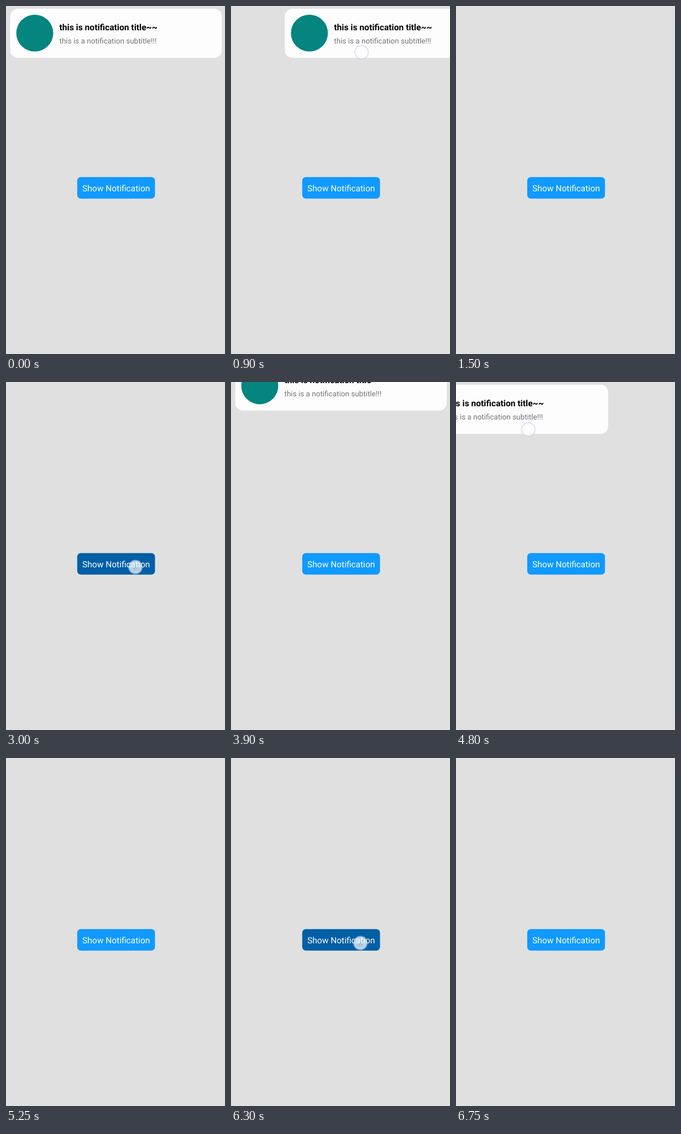
An HTML page that plays this animation: 396 by 631 pixels, repeating every 8 s.

```html
<!DOCTYPE html>
<html lang="en">
<head>
<meta charset="utf-8">
<title>Swipe to dismiss</title>
<style>
  html, body { margin: 0; width: 100%; height: 100%; overflow: hidden; background: #e0e0e0; }
  svg { display: block; width: 396px; height: 631px; font-family: Roboto, sans-serif; text-rendering: geometricPrecision; }
</style>
</head>
<body>
<svg viewBox="0 0 396 631">
  <defs>
    <radialGradient id="glow">
      <stop offset="0" stop-color="#fff" stop-opacity=".6"/>
      <stop offset=".76" stop-color="#fff" stop-opacity=".75"/>
      <stop offset=".9" stop-color="#c4c0ee" stop-opacity=".6"/>
      <stop offset="1" stop-color="#c4c0ee" stop-opacity="0"/>
    </radialGradient>
  </defs>
  <rect id="button" x="128.8" y="310.2" width="140.6" height="39" rx="6.5"/>
  <text x="199.2" y="336" font-size="15.5" fill="#fff" text-anchor="middle">Show Notification</text>
  <g id="card">
    <rect x="7.6" y="5" width="382.6" height="89" rx="14" fill="#fdfdfd"/>
    <circle cx="52" cy="49.2" r="33.4" fill="#04857f"/>
    <text x="96.5" y="44" font-size="15.6" font-weight="700">this is notification title~~</text>
    <text x="96.5" y="68.3" font-size="13.5" fill="#757575">this is a notification subtitle!!!</text>
  </g>
  <circle id="touch" r="13.8" fill="url(#glow)"/>
</svg>
<script>
const LOOP = 8000, STEP = 150;
const [button, card, touch] = ['button', 'card', 'touch'].map(id => document.getElementById(id));

const enter = { start: 3750, length: 450 };
// The finger starts at x, y, moves by dx and drops along a power curve
const swipes = [
  { start: 450 + STEP, length: 900, dir: 1, x: 146, y: 72, dx: 270, drop: 450, bend: 3.3 },
  { start: 4500, length: 750, dir: -1, x: 250, y: 76, dx: -298, drop: 64, bend: 2 }
];
const taps = [{ start: 3000, length: 600 }, { start: 6300, length: 450 }];

const progress = (move, t) => Math.min(1, Math.max(0, (t - move.start) / move.length));
const active = (move, t) => t >= move.start && t < move.start + move.length;
const mix = (a, b, k) => `rgb(${a.map((v, i) => Math.round(v + (b[i] - v) * k))})`;
const place = (el, x, y) => el.setAttribute('transform', `translate(${x} ${y})`);

function draw() {
  const t = Math.floor((performance.now() % LOOP) / STEP) * STEP;
  const swipe = swipes[t < enter.start ? 0 : 1];
  const p = progress(swipe, t);
  const rise = t < enter.start ? 0 : (1 - progress(enter, t)) ** 2;
  place(card, swipe.dir * 400 * p ** 1.36, -95 * rise);

  let press = 0, fade = 0;
  if (active(swipe, t) && p < 0.9) {
    fade = 1;
    place(touch, swipe.x + swipe.dx * p, swipe.y + swipe.drop * p ** swipe.bend);
  }
  const tap = taps.find(move => active(move, t));
  if (tap) {
    const q = progress(tap, t);
    press = Math.min(1, (1 - q) * 1.6);
    fade = Math.max(0, 1 - q * 1.5);
    place(touch, 234, 335.5);
  }
  button.setAttribute('fill', mix([16, 154, 255], [0, 95, 165], press));
  touch.setAttribute('opacity', fade);
  requestAnimationFrame(draw);
}
draw();
</script>
</body>
</html>
```
